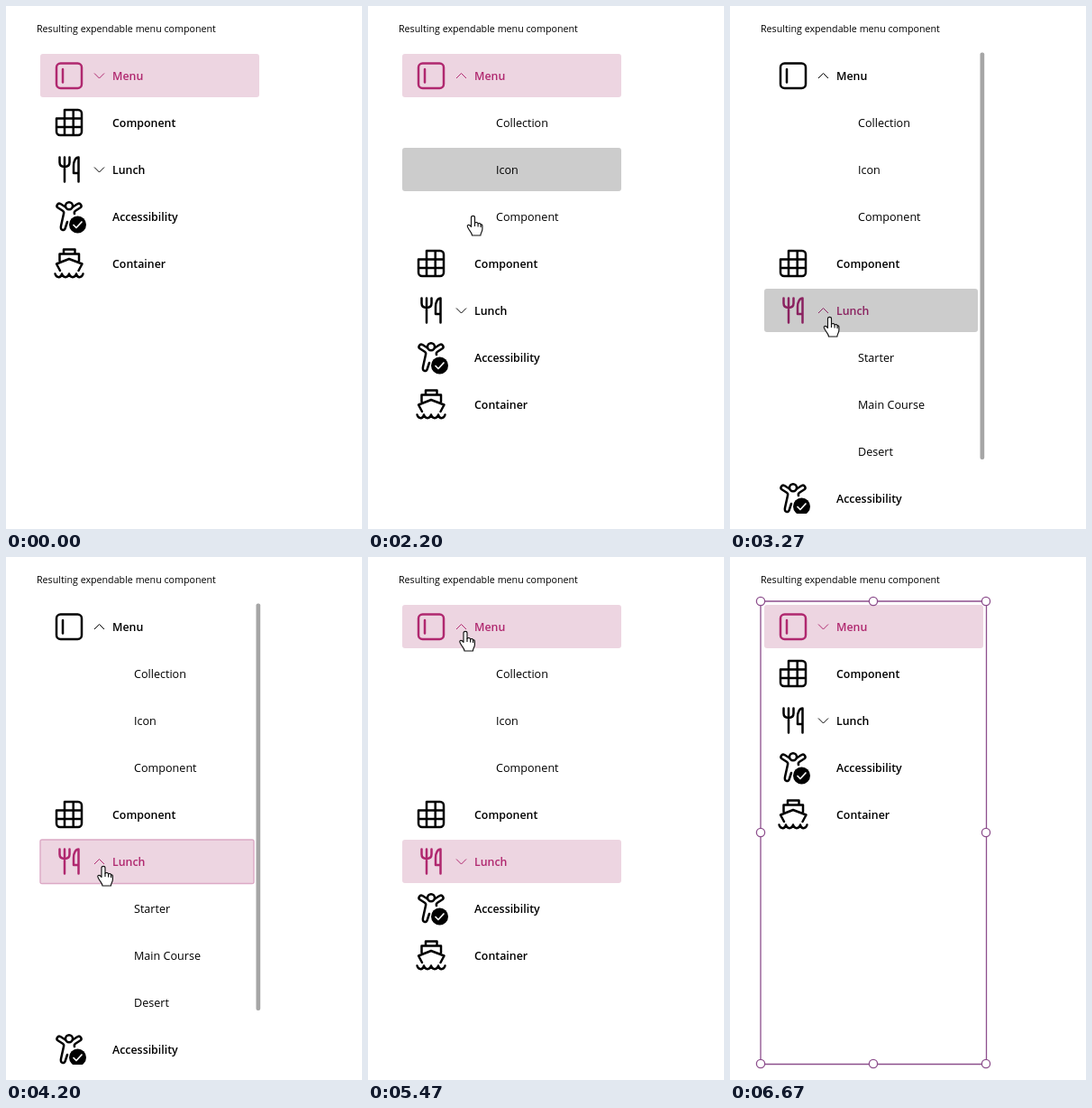
These frames come from a looping animation (395 by 579 pixels, 7600 ms). An HTML page:

```html
<!DOCTYPE html>
<html lang="en">
<head>
<meta charset="utf-8">
<title>Expandable menu</title>
<style>
html, body { margin: 0; width: 100%; height: 100%; overflow: hidden; background: #fff; }
svg { display: block; width: 395px; height: 579px; font: 12.6px "Open Sans", "Noto Sans", sans-serif; }
.icon { fill: none; stroke: currentColor; stroke-width: 2.5; stroke-linecap: round; stroke-linejoin: round; }
.chevron { fill: none; stroke: currentColor; }
.main { font-weight: 600; font-size: 12.4px; }
text { fill: currentColor; }
</style>
</head>
<body>
<svg viewBox="0 0 395 579">
  <defs>
    <clipPath id="view"><rect x="30" y="45" width="260" height="517"/></clipPath>
    <g id="menu"><rect x="-14" y="-13.5" width="28" height="27.5" rx="4.5"/><path d="M-7-7V7.5"/></g>
    <path id="grid" d="M-5-14H10a4 4 0 0 1 4 4V10a4 4 0 0 1-4 4H-10a4 4 0 0 1-4-4V-4.500H-5ZM-5-4.500H14M-14 5H14M-5-5V14M4.700-14V14"/>
    <path id="lunch" d="M-10.500-13.500V-8C-10.500-4-7.500-3-5-3S.500-4 .500-8V-13.500M-5-13.500V13.500M10.500 13.500V-13.500C7.500-13.500 5-9.500 5-4V4H10.500"/>
    <g id="person">
      <circle cy="-11.800" r="4"/>
      <path d="M-4-10.500-9.500-14C-12.500-15.500-15-11.500-12.500-9.700L-7-6.200C-5.700-5.300-5.500-4.500-6-3L-9 10.500C-10 15.500-5.500 16.500-4.300 13L-2 6M4-10.500 9.500-14C12.500-15.500 15-11.500 12.500-9.700L7-6.200C5.700-5.300 5.500-4.500 6-3"/>
      <circle cx="9.500" cy="9" r="9.500" fill="currentColor" stroke="none"/>
      <path d="M5 9.500 8 12.500 14 6" stroke="#fff" stroke-width="1.700"/>
    </g>
    <path id="ship" d="M-6-10.500V-15.500H6.500V-10.500M-10.500-3V-10.500H11V-3M-10 8-14 .500 0-5 14.500 .500 10.500 8M-15.500 11.500C-14 16.500-9 16.500-8 11.500-6.500 16.500-1.500 16.500 0 11.500 1.500 16.500 6.500 16.500 8 11.500 9 16.500 14 16.500 15.500 11.500"/>
    <g id="hand" fill="#fff" stroke="#111" stroke-width="1.150" stroke-linejoin="round">
      <path d="M-2 2.200C-2-.300 2-.300 2 2.200V8.200C3.500 7 5.300 7.500 5.600 9 6.800 8 8.400 8.600 8.600 10 9.500 9.400 10.400 10 10.400 11.500V15C10.400 18 8.400 19 8.400 22H-1C-1.200 19-3.500 17.500-5 14.500-6.500 12-6.600 11-5.500 10.500-4.300 10-3 11-2 12.500Z"/>
      <path d="M2 8V12M5.600 9V12.500M8.600 10V13" fill="none"/>
    </g>
    <path id="arrow" d="M0 0V16.500L4 13 6.500 18.500 9 17.400 6.600 12H11.800Z" fill="#fff" stroke="#111"/>
  </defs>
  <text x="34" y="29" font-size="10.700">Resulting expendable menu component</text>
  <g id="stage"></g>
</svg>
<script>
const LOOP = 7600, PITCH = 52;
const MENU = 0, LUNCH = 5;
const BLACK = '#000', ACCENT = '#b0286f', DEEP = '#8a2260';

// label, icon, parent index
const items = [
  ['Menu', 'menu'], ['Collection', '', MENU], ['Icon', '', MENU], ['Component', '', MENU],
  ['Component', 'grid'],
  ['Lunch', 'lunch'], ['Starter', '', LUNCH], ['Main Course', '', LUNCH], ['Desert', '', LUNCH],
  ['Accessibility', 'person'], ['Container', 'ship']
];

// Each entry changes part of the state from its time on.
const start = { hover: -1, selected: MENU, open: [], pressed: false, border: false, framed: false };
const events = [
  [870, { hover: MENU }], [1330, { border: true }], [1400, { pressed: true }],
  [1600, { border: false, pressed: false, open: [MENU] }],
  [2130, { hover: 1 }], [2200, { hover: 2 }], [2270, { hover: 3 }], [2400, { hover: 4 }], [2600, { hover: LUNCH }],
  [3000, { pressed: true }], [3070, { pressed: false, selected: LUNCH, open: [MENU, LUNCH] }],
  [4130, { border: true }], [4200, { pressed: true }],
  [4400, { border: false, pressed: false, open: [MENU] }],
  [4600, { hover: 4 }], [4670, { hover: 3 }], [4730, { hover: 2 }], [4800, { hover: 1 }], [5000, { hover: MENU }],
  [5470, { pressed: true }], [5670, { selected: MENU, open: [] }], [5730, { pressed: false }],
  [6070, { hover: 4 }], [6130, { hover: 9 }], [6200, { hover: -1 }], [6600, { framed: true }]
];

// Pointer path: time, x, y of the tip
const path = [
  [130, 388, 304], [270, 300, 230], [400, 170, 130], [530, 100, 84], [670, 83, 73], [870, 83, 73],
  [930, 89, 76], [1130, 108.5, 87], [2000, 108.5, 87], [2070, 110, 110], [2130, 113, 165], [2200, 116.5, 232],
  [2330, 115, 290], [2530, 112, 335], [2800, 110.5, 344], [3270, 110.5, 344], [3400, 114, 346],
  [3600, 108, 340], [3800, 101, 338], [3930, 108, 342], [4400, 108, 342], [4470, 108.5, 328],
  [4600, 110, 235], [4800, 108.5, 119], [4930, 108, 95], [5130, 107, 84], [5330, 108, 82],
  [5930, 108, 82], [6000, 106, 118], [6070, 102.5, 208], [6200, 100, 350], [6400, 112, 490], [6600, 122, 580]
];

function pointer(t) {
  const i = path.findIndex(p => p[0] > t);
  if (i < 1) return null;
  const [t0, x0, y0] = path[i - 1], [t1, x1, y1] = path[i];
  const k = (t - t0) / (t1 - t0);
  return [x0 + (x1 - x0) * k, y0 + (y1 - y0) * k];
}

function drawRow(i, y, width, s) {
  const [label, icon, parent] = items[i];
  const hover = i === s.hover, pressed = hover && s.pressed, selected = i === s.selected;
  const color = pressed ? ACCENT : selected ? (hover ? DEEP : ACCENT) : BLACK;
  const fill = pressed || selected && !hover ? '#edd5e1' : hover ? '#ccc' : 'none';
  let out = `<g color="${color}" transform="translate(0 ${y})">
    <rect x="38" y="-24" width="${width}" height="48" rx="3" fill="${fill}"/>`;
  if (hover && s.border)
    out += `<rect x="38" y="-24" width="${width}" height="48.5" rx="2" fill="none" stroke="#dca9c5" stroke-width="1.4"/>`;
  if (parent !== undefined) return out + `<text x="142" y="4.5">${label}</text></g>`;
  out += `<use href="#${icon}" class="icon" x="70"/><text class="main" x="118" y="4.5">${label}</text>`;
  if (i === MENU || i === LUNCH)
    out += `<path class="chevron" d="${s.open.includes(i) ? 'M98 3l5.500-5.500 5.500 5.500' : 'M98-2.500l5.500 5.500 5.500-5.500'}"/>`;
  return out + '</g>';
}

function drawFrame() {
  const grips = [34, 159, 284].flatMap(x => [49, 305, 561].map(y => [x, y])).filter(([x, y]) => x !== 159 || y !== 305);
  return '<g fill="none" stroke="#8d4f8d" stroke-width="1.3"><path d="M34 49H284.500V561.500H34Z"/>' +
    grips.map(([x, y]) => `<circle cx="${x}" cy="${y}" r="4.600" fill="#fff"/>`).join('') + '</g>';
}

function draw(t) {
  const s = Object.assign({}, start, ...events.filter(e => e[0] <= t).map(e => e[1]));
  const shown = items.map((_, i) => i).filter(i => items[i][2] === undefined || s.open.includes(items[i][2]));
  const scroll = s.open.length > 1;
  let out = '<g clip-path="url(#view)">' +
    shown.map((i, n) => drawRow(i, 77 + n * PITCH, scroll ? 237 : 243, s)).join('') + '</g>';
  if (scroll) out += '<rect x="277.500" y="51.500" width="4.700" height="450.500" rx="2" fill="#a6a6a6"/>';
  if (s.framed) out += drawFrame();
  const tip = pointer(t);
  if (tip) out += `<use href="#${s.hover < 0 ? 'arrow' : 'hand'}" x="${tip[0]}" y="${tip[1]}"/>`;
  return out;
}

const stage = document.getElementById('stage');
let last = -1;
function tick() {
  // The picture advances 15 times a second.
  const step = Math.floor((performance.now() % LOOP + 4) * 15 / 1000);
  if (step !== last) {
    last = step;
    stage.innerHTML = draw(Math.round(step * 100 / 15) * 10);
  }
  requestAnimationFrame(tick);
}
tick();
</script>
</body>
</html>
```
